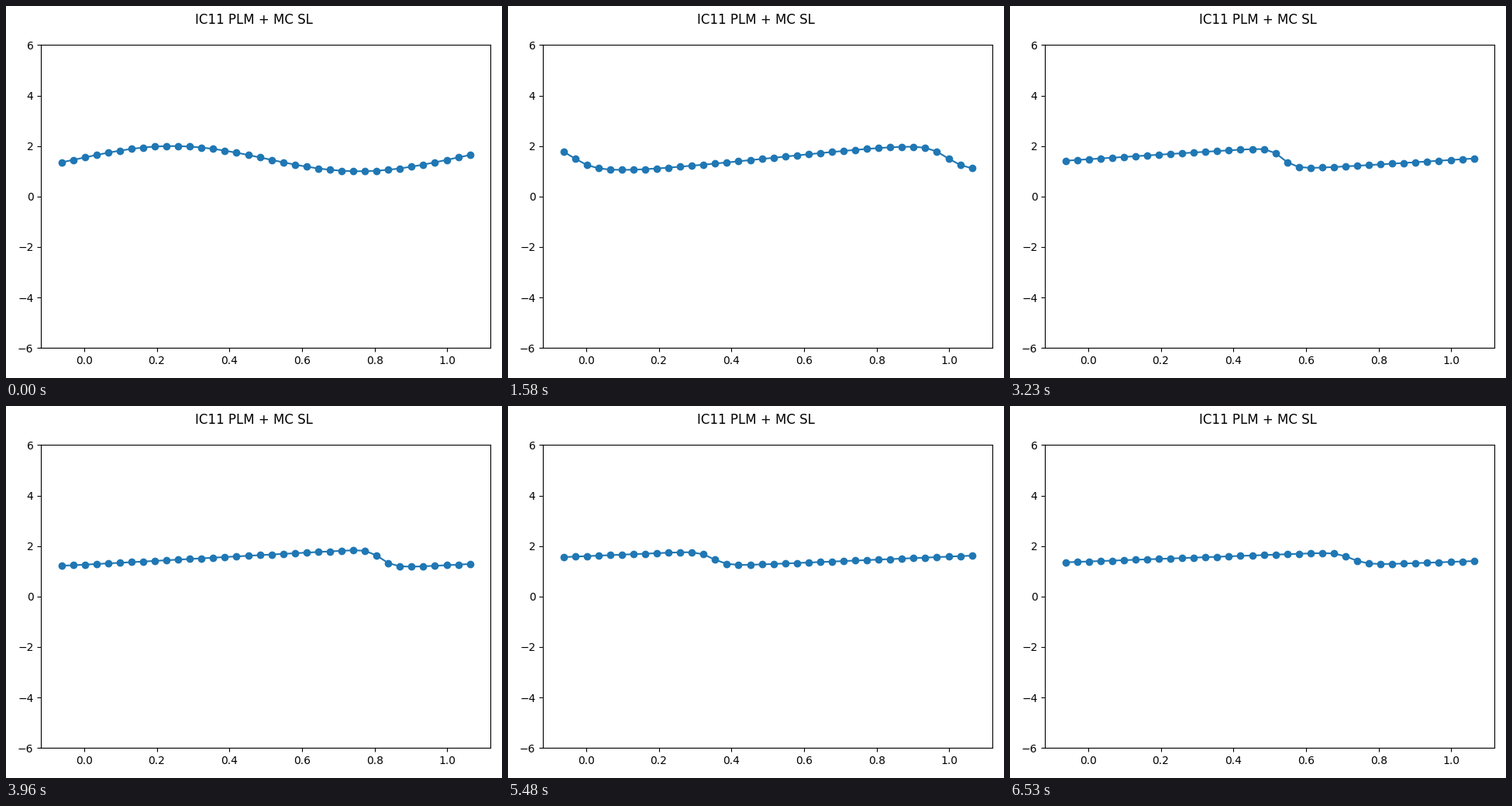
A matplotlib script for the animation above (6600 ms loop, 640x480 px).

```python
import numpy as np
import matplotlib.pyplot as plt
from matplotlib.animation import FuncAnimation

CELLS = 32
GHOSTS = 2
CFL = 0.9
FRAMES = 100
INTERVAL = 66  # ms
WIDTH, HEIGHT, DPI = 640, 480, 100

dx = 1 / CELLS


def step(u):
    """Advance Burgers' equation by one conservative Godunov step.

    The velocity is positive everywhere, so each face takes the flux of
    the cell on its left.
    """
    ratio = CFL / u.max()  # dt / dx
    flux = 0.5 * u**2
    return u - ratio * (flux - np.roll(flux, 1))


def solve():
    """Return every state, padded with periodic ghost cells."""
    centres = (np.arange(CELLS) + 0.5) * dx
    states = [1.5 + 0.5 * np.sin(2 * np.pi * centres)]
    while len(states) < FRAMES:
        states.append(step(states[-1]))
    return [np.pad(u, GHOSTS, mode="wrap") for u in states]


states = solve()
x = np.linspace(-GHOSTS * dx, 1 + GHOSTS * dx, CELLS + 2 * GHOSTS)

fig, ax = plt.subplots(figsize=(WIDTH / DPI, HEIGHT / DPI), dpi=DPI)
fig.suptitle("IC11 PLM + MC SL", y=0.982)
line, = ax.plot(x, states[0], "o-")
ax.set_ylim(-6, 6)
fig.tight_layout()
fig.subplots_adjust(top=1 - 50.4 / HEIGHT)


def update(i):
    line.set_ydata(states[i])
    return line,


anim = FuncAnimation(fig, update, frames=FRAMES, interval=INTERVAL,
                     repeat=True, repeat_delay=0)
plt.show()
```
